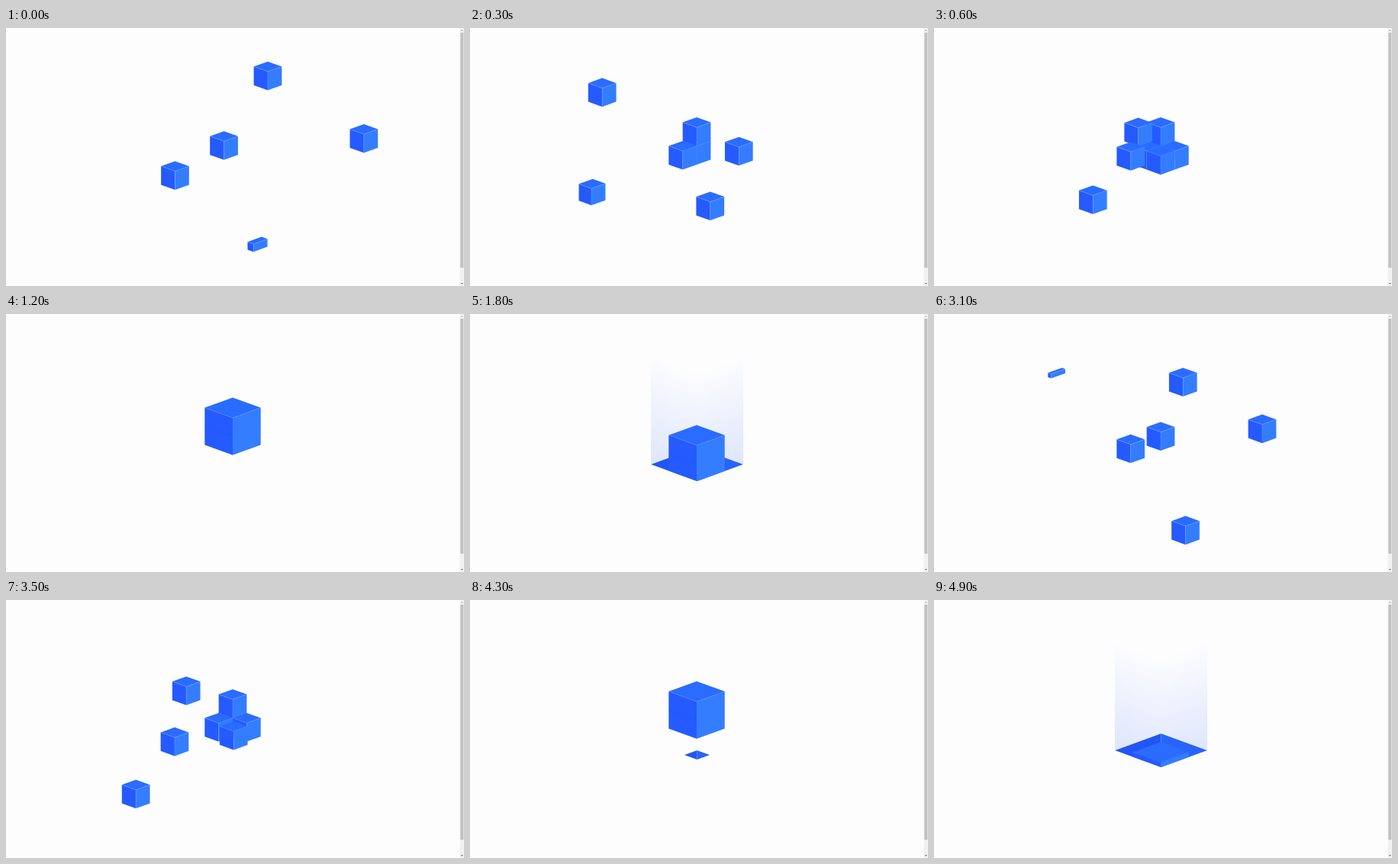
These frames come from a looping animation (600 px wide and 338 px high, 5000 ms). An HTML page with a canvas:

```html
<!DOCTYPE html>
<html lang="en">
<head>
<meta charset="utf-8">
<title>Cube assembly</title>
<style>
  html, body { margin: 0; width: 100%; height: 100%; overflow: hidden; background: #fdfdfe; }
  canvas { display: block; width: 600px; height: 338px; }
</style>
</head>
<body>
<canvas id="stage" width="600" height="338"></canvas>
<script>
const ctx = document.getElementById('stage').getContext('2d');

const LOOP = 5000, CYCLE = 3000, STEP = 100;
const W = 18.35, H = 6.6, Z = 24.4;      // screen size of one unit edge
const X = 297, REST = 117;               // back top corner of the finished block
const TOP = '#2a6cff', LEFT = '#245aff', RIGHT = '#347dff';

// cell (u, v, w), start offset, then times: grow, move, arrive
const cubes = [
  { cell: [0, 0, 0], from: [-116, -63.3], at: [-547, -356, 39] },
  { cell: [0, 1, 0], from: [-143, 66],    at: [-426, -237, 158] },
  { cell: [1, 0, 0], from: [153.5, -22],  at: [-184, 0, 395] },
  { cell: [0, 0, 1], from: [66, -105],    at: [-305, -120, 275] },
  { cell: [1, 1, 0], from: [32.5, 110],   at: [-63, 120, 515] },
  { cell: [0, 1, 1], from: [-118, -65],   at: [65, 260, 635] },
  { cell: [1, 1, 1], from: [-137, 66],    at: [165, 334, 707] },
  { cell: [1, 0, 1], from: [-157, 121],   at: [300, 469, 881] }
];
const JOINED = 900, PEAK = 1528;

const ramp = (t, a, b) => Math.min(1, Math.max(0, (t - a) / (b - a)));

function path(pts) {
  ctx.beginPath();
  pts.forEach(([x, y]) => ctx.lineTo(x, y));
}

function poly(fill, ...pts) {
  path(pts);
  ctx.closePath();
  ctx.fillStyle = fill;
  ctx.fill();
}

function line(color, ...pts) {
  path(pts);
  ctx.strokeStyle = color;
  ctx.lineWidth = 0.7;
  ctx.stroke();
}

// (x, y) is the back corner of the top face
function box(x, y, u, v, w, edge) {
  const down = ([px, py]) => [px, py + w * Z];
  const b = [x, y];
  const l = [x - v * W, y + v * H];
  const r = [x + u * W, y + u * H];
  const f = [x + (u - v) * W, y + (u + v) * H];
  poly(LEFT, l, f, down(f), down(l));
  poly(RIGHT, f, r, down(r), down(f));
  poly(TOP, b, r, f, l);
  line(edge, l, f, r);
  line(edge, f, down(f));
}

function drawCube({ cell: [u, v, w], from, at: [grow, move, end] }, t) {
  const size = ramp(t, grow, grow + 150);
  if (!size) return;
  const left = 1 - ramp(t, move, end);
  const cx = X + (u - v) * W + from[0] * left;
  const cy = REST + (u + v + 1) * H + (1.5 - w) * Z + from[1] * left;
  box(cx - (size - 1) * W / 2, cy - (size + 1) * H / 2 - size * Z / 2,
      size, 1, size, 'rgba(125,175,255,.5)');
}

function drawBeam(alpha) {
  if (!alpha) return;
  ctx.save();
  path([[237, 0], [237, 197], [297.5, 175], [358, 197], [358, 0]]);
  ctx.clip();
  ctx.globalAlpha = alpha;
  for (const side of [-1, 1]) {
    ctx.save();
    ctx.translate(297.5, 0);
    ctx.transform(side, 0, 0, 1, 0, 0);
    ctx.transform(1, -0.366, 0, 1, 0, 0);
    const g = ctx.createLinearGradient(0, 76, 0, 219);
    g.addColorStop(0, 'rgba(70,115,250,0)');
    g.addColorStop(1, 'rgba(70,115,250,.17)');
    ctx.fillStyle = g;
    ctx.fillRect(0, 70, 60.5, 150);
    ctx.restore();
  }
  ctx.restore();
}

function drawHole(s) {
  if (!s) return;
  const x = 297.5, y = 205.3 - 8.3 * s, hw = 60.3 * s, hh = 22 * s;
  poly('#2156f4', [x - hw, y], [x, y - hh], [x, y + hh]);
  poly('#2864fa', [x + hw, y], [x, y - hh], [x, y + hh]);
}

function drawBlock(t) {
  if (t < JOINED || t > 2050) return;
  const lift = 18 * ramp(t, JOINED, PEAK) ** 1.2;
  const fall = Math.max(0, t - PEAK) / 100;
  const y = REST - lift + 6.3 * fall * fall;
  ctx.save();
  if (fall) {
    path([[237.2, 0], [237.2, 197], [297.5, 219], [357.8, 197], [357.8, 0]]);
    ctx.clip();
  }
  box(X, y, 2, 2, 2, 'rgba(110,160,255,.2)');
  line('rgba(20,70,235,.25)', [X - 2 * W, y + 2 * H + Z], [X, y + 4 * H + Z]);
  ctx.restore();
}

function drawScrollbar() {
  ctx.fillStyle = '#f1f1f1';
  ctx.fillRect(594.5, 0, 5.5, 338);
  ctx.fillStyle = '#c1c1c1';
  ctx.fillRect(595.3, 6, 4, 308);
  poly('#a3a3a3', [595.8, 3.8], [597.3, 2.2], [598.8, 3.8]);
  poly('#505050', [595.8, 334.2], [597.3, 335.8], [598.8, 334.2]);
}

function draw(t) {
  const p = t % CYCLE;
  ctx.fillStyle = '#fdfdfe';
  ctx.fillRect(0, 0, 600, 338);
  drawBeam(ramp(p, 1400, 1600) - ramp(p, 2050, 2250));
  drawHole(ramp(p, 1245, 1445) - ramp(p, 2100, 2300));
  drawBlock(p);
  const q = p >= 2400 ? p - CYCLE : p;
  if (q < JOINED) cubes.forEach(c => drawCube(c, q));
  drawScrollbar();
}

const start = performance.now();
function tick() {
  const t = Math.max(0, performance.now() - start) % LOOP;
  draw(Math.floor(t / STEP) * STEP);
  requestAnimationFrame(tick);
}
tick();
</script>
</body>
</html>
```
